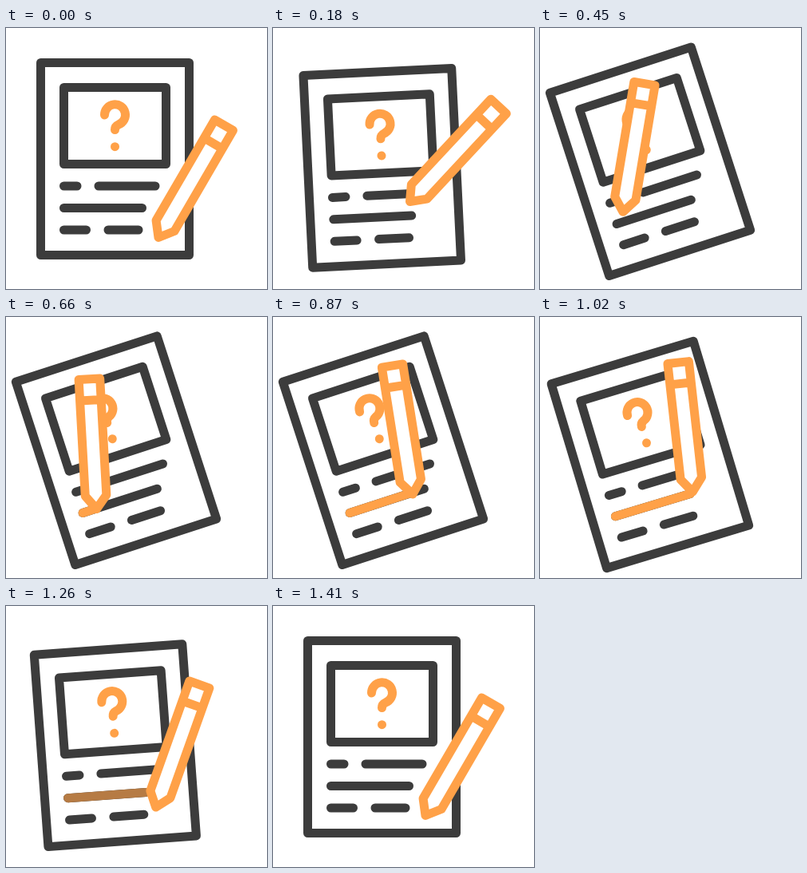
Animation, 327 px wide and 327 px high, one loop 1500 ms. Source, as an HTML page with a canvas:

```html
<!DOCTYPE html>
<html lang="en">
<head>
<meta charset="utf-8">
<style>
  html, body { margin: 0; height: 100%; overflow: hidden; background: #fff; }
  canvas { display: block; }
</style>
</head>
<body>
<canvas id="stage" width="327" height="327"></canvas>
<script>
const ctx = document.getElementById('stage').getContext('2d');
const LOOP = 1500, STEP = 30;
const WRITE_START = 530, WRITE_END = 960;
const DARK = [60, 60, 60], ORANGE = [255, 161, 72];

// time, tilt in degrees, vertical shift
const pageKeys = [
  [90, 0, 0], [180, -2.8, 11.3], [255, -8, 18.5], [330, -13, 11.4], [460, -18, 3.2],
  [950, -18, 3.2], [1140, -10.9, 19], [1170, -9.1, 17.8], [1410, 0, 0]
];
// time, tip x, tip y, tilt in degrees
const pencilKeys = [
  [90, 191, 262.5, 30.2], [150, 182, 233, 39], [180, 171.5, 217.5, 43], [330, 132, 205, 29.5],
  [530, 96, 245.5, -1], [660, 113.5, 240.5, -3.2], [870, 175, 222, -9],
  [960, 189.5, 215, -10], [1140, 185.6, 237.5, 6.3], [1410, 191, 262.5, 30.2]
];

const clamp = v => Math.max(0, Math.min(1, v));
const rgb = c => `rgb(${c.map(Math.round)})`;
const mix = (a, b, k) => rgb(a.map((v, i) => v + (b[i] - v) * k));

// Smooth curve through the keys; it rests at both ends and beside flat stretches.
function sample(keys, t, col) {
  const last = keys.length - 1;
  if (t <= keys[0][0]) return keys[0][col];
  if (t >= keys[last][0]) return keys[last][col];
  const i = keys.findIndex(k => k[0] > t) - 1;
  const span = n => keys[n + 1][0] - keys[n][0];
  const slope = n => (keys[n + 1][col] - keys[n][col]) / span(n);
  const tangent = n => {
    if (n === 0 || n === last) return 0;
    const a = slope(n - 1), b = slope(n), ha = span(n - 1), hb = span(n);
    return a * b === 0 ? 0 : (a * hb + b * ha) / (ha + hb);
  };
  const h = span(i), u = (t - keys[i][0]) / h, v = 1 - u;
  return keys[i][col] * (1 + 2 * u) * v * v + keys[i + 1][col] * u * u * (3 - 2 * u)
    + h * u * v * (tangent(i) * v - tangent(i + 1) * u);
}

function stroke(color, d, fill) {
  const path = new Path2D(d);
  if (fill) { ctx.fillStyle = fill; ctx.fill(path); }
  ctx.strokeStyle = color;
  ctx.stroke(path);
}

function place(x, y, degrees, paint) {
  ctx.save();
  ctx.translate(x, y);
  ctx.rotate(degrees * Math.PI / 180);
  paint();
  ctx.restore();
}

function drawPage(written, fade) {
  ctx.translate(-136.5, -164);
  stroke(rgb(DARK), 'M43.5 43.5H229.5V284.5H43.5ZM72.5 74.5H200.5V170.5H72.5Z'
    + 'M72.5 198H89M116 198H187M72.5 225.5H170.5M72.5 253H100.5M128 253H166');
  stroke(rgb(ORANGE), 'M123.5 109A13 13 0 1 1 141 121Q136.5 123 136.5 127.5M136.5 148.7h.01');
  if (written >= 0) stroke(mix(ORANGE, DARK, fade), `M72.5 225.5h${98 * written + 0.01}`);
}

function drawPencil() {
  stroke(rgb(ORANGE), 'M0 0L-13.3 -17V-163H13.3V-17ZM-13.3 -136.5H13.3', '#fff');
}

function draw(t) {
  const tilt = sample(pageKeys, t, 1);
  const [tipX, tipY, lean] = [1, 2, 3].map(col => sample(pencilKeys, t, col));
  const written = t < WRITE_START || t >= 1410 ? -1
    : t > WRITE_END ? 1 : clamp((tipX - 96) / 93.5);

  ctx.fillStyle = '#fff';
  ctx.fillRect(0, 0, 327, 327);
  ctx.lineWidth = 11;
  ctx.lineCap = ctx.lineJoin = 'round';
  place(136.5 - tilt / 12, 164 + sample(pageKeys, t, 2), tilt,
    () => drawPage(written, clamp((t - 1170) / 240)));
  place(tipX, tipY, lean, drawPencil);
}

const start = performance.now();
function frame() {
  const t = (performance.now() - start) % LOOP;
  draw(Math.floor(t / STEP) * STEP);
  requestAnimationFrame(frame);
}
frame();
</script>
</body>
</html>
```
